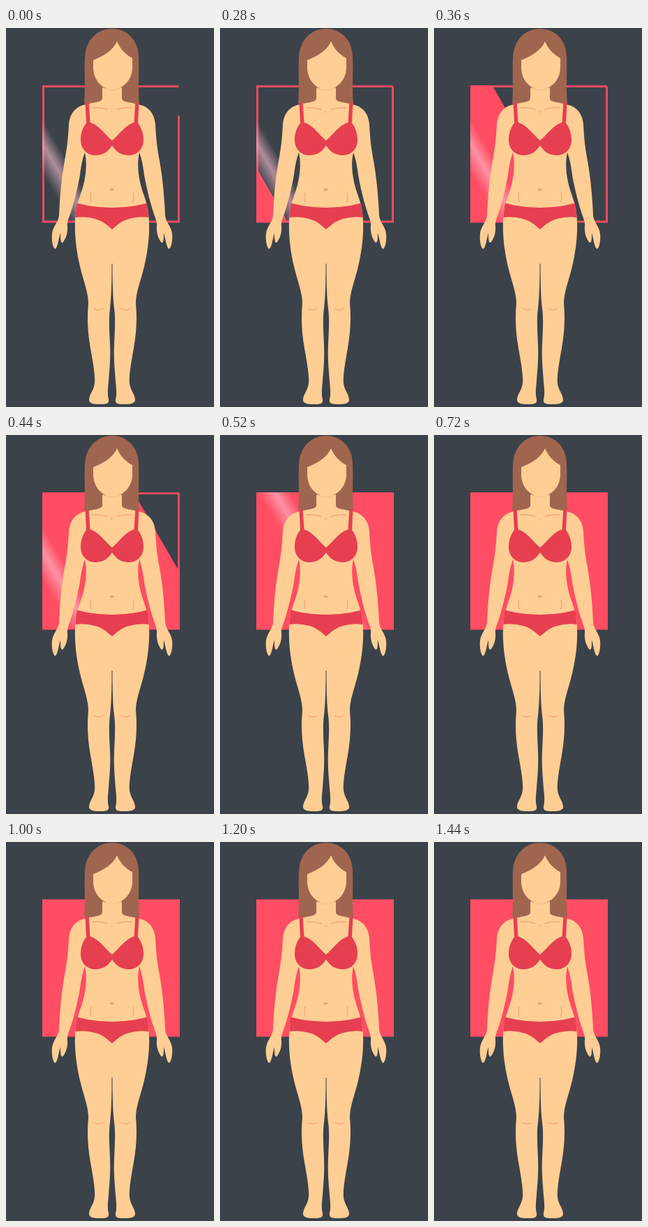
Recreate the animation shown at these times as an HTML page. Size 298 by 542 pixels, loop 1.48 s.

```html
<!DOCTYPE html>
<html lang="en">
<head>
<meta charset="utf-8">
<title>Figure with square</title>
<style>
  html, body { margin: 0; width: 100%; height: 100%; overflow: hidden; background: #3b424a; }
  svg { display: block; width: 100vw; height: 100vh; }
  .skin { fill: #ffce94; }
  .red { fill: #e63f50; }
  .mark { fill: none; stroke: #f5a575; stroke-width: 1.3; stroke-linecap: round; }
</style>
</head>
<body>
<svg viewBox="0 0 298 542">
  <defs>
    <clipPath id="wipe"><path id="edge" d="M0 0L400 692V1400H0z"/></clipPath>
    <clipPath id="square"><path d="M52 82H249V278H52z"/></clipPath>
    <linearGradient id="glow" gradientUnits="userSpaceOnUse" x1="-17" y1="10" x2="17" y2="-10">
      <stop offset="0" stop-color="#ffc0d0" stop-opacity="0"/>
      <stop offset=".55" stop-color="#ffc0d0" stop-opacity=".6"/>
      <stop offset="1" stop-color="#ffc0d0" stop-opacity="0"/>
    </linearGradient>
  </defs>
  <rect width="298" height="542" fill="#3b424a"/>

  <path id="frame" d="M247.5 83.5H53.5V277H247.5V83.5" fill="none" stroke="#ee4b5f" stroke-width="3"/>
  <g clip-path="url(#wipe)"><path d="M52 82H249V278H52z" fill="#ff4d63"/></g>
  <g clip-path="url(#square)"><path id="shine" d="M0 -60L400 632V752L0 60z" fill="url(#glow)"/></g>

  <path d="M112 108C114 85 112 62 113 42C114 18 130 1 152 1C174 1 190 18 190 42C191 62 189 85 191 108z" fill="#a0654f"/>

  <g id="half">
    <path class="skin" d="M152 86H138V101C137 107 122 106 108 111C96 116 91 126 90 138C89 157 88 168 84 190C79 218 77 245 76 268C75 278 67 284 66 294C65 304 67 313 70 316C74 315 75 303 78 293C78 301 78 307 81 307C85 303 89 293 88 284C87 277 91 270 94 260C100 240 104 222 106 210C108 194 110 186 113 178C116 192 115 206 112 220C109 235 102 247 100 264C97 288 100 316 106 341C111 362 118 378 118 394C116 415 117 435 121 458C125 480 128 498 127 508C126 518 119 524 119 532C119 537 126 538 134 538C144 538 148 537 147 531C145 523 146 516 147 505C148 490 150 475 149 452C148 430 147 416 149 401C151 384 151.5 364 151.5 337H152z"/>
    <path class="red" d="M113.500 107H118.700L120.500 135C134 139 143 154 152 161V168C146 177 139 182 128 182C115 182 107 172 107 160C107 149 111 141 115 136z"/>
    <path class="red" d="M102 250.500Q126 257 152.300 257V288C146 284 142 277 128 273Q114 269 99.500 271Q100 260 102 250.500z"/>
    <path class="mark" d="M124 114Q139 114 145 116.500M122 236Q120 243 122.500 249"/>
    <path class="mark" d="M127 401.500Q133 405 139.500 401.500"/>
  </g>
  <use href="#half" transform="matrix(-1 0 0 1 304 0)"/>

  <path d="M138.500 85Q152 93 166 85" fill="none" stroke="#f8bd84" stroke-width="1"/>
  <path class="skin" d="M159 19C155 30 141 40 125 46V58C126 76 139 88 152.500 88C166 88 180 76 181 58V43C171 38 163 29 159 19z"/>
  <ellipse cx="151.500" cy="231" rx="3" ry="1.700" fill="#f39b72"/>
  <ellipse cx="151.500" cy="120" rx="1.700" ry=".8" fill="#f5a575"/>
</svg>
<script>
  const LOOP = 1480, STEP = 40, SIDE = 778;
  const [frame, edge, shine] = ["frame", "edge", "shine"].map(id => document.getElementById(id));

  const ramp = (t, t0, t1, a, b) =>
    a + (b - a) * Math.min(1, Math.max(0, (t - t0) / (t1 - t0)));
  const slide = (el, y) => el.setAttribute("transform", `translate(0 ${y})`);

  function draw(now) {
    const t = Math.floor(now % LOOP / STEP) * STEP;
    const drawn = ramp(t, 0, 80, SIDE - 45, SIDE);
    frame.setAttribute("stroke-dasharray", drawn < SIDE ? `${drawn} ${SIDE}` : "none");
    slide(edge, ramp(t, 245, 500, 185, -363));
    slide(shine, ramp(t, 475, 650, 80, -420));
    requestAnimationFrame(draw);
  }
  draw(performance.now());
</script>
</body>
</html>
```
